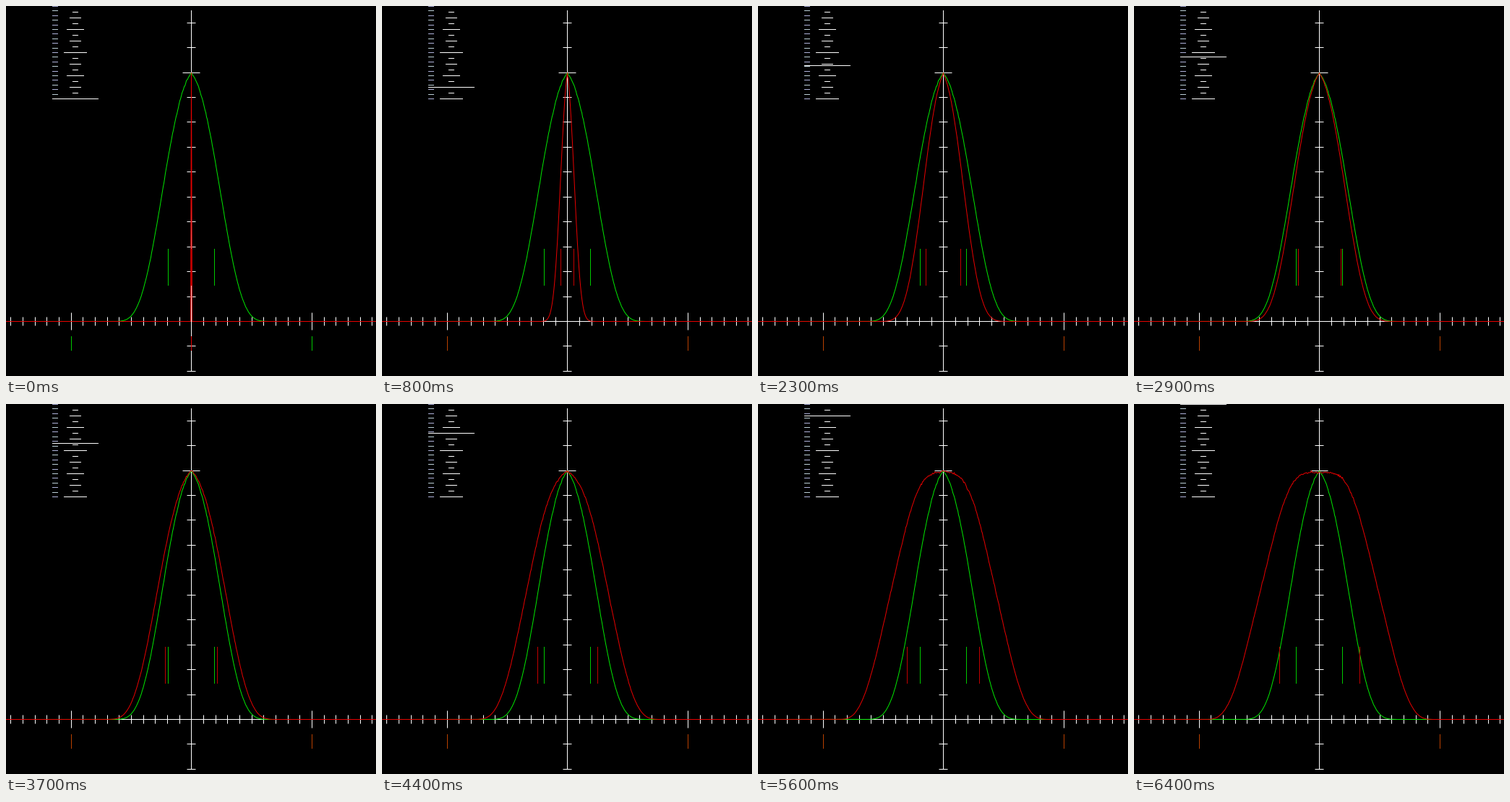
Write a matplotlib script that moves like this. It is 512x512 px and loops after 6.5 s.

```python
import numpy as np
import matplotlib.pyplot as plt
from matplotlib.animation import FuncAnimation

SIZE, DPI = 512, 64
STEPS = 64
CX, BASE = 256, 436          # origin of the plot in pixels
UNIT_X, UNIT_Y = 166.67, 344.5
PX = 72 / DPI                # one pixel in points

WHITE = "#ffffff"
GREEN, RED = "#00e600", "#e60000"
DIM_GREEN, DIM_RED, MIXED = "#00c800", "#c00000", "#b84000"

fig = plt.figure(figsize=(SIZE / DPI, SIZE / DPI), dpi=DPI, facecolor="black")
ax = fig.add_axes([0, 0, 1, 1])
ax.set_xlim(0, SIZE)
ax.set_ylim(SIZE, 0)
ax.axis("off")


def stroke(xs, ys, color, z):
    return ax.plot(xs, ys, color=color, lw=PX, zorder=z, snap=False,
                   solid_capstyle="butt")[0]


def hline(y, x0, x1, color=WHITE, z=1):
    y = round(y) + 0.5
    return stroke([x0, x1], [y, y], color, z)


def vline(x, y0, y1, color=WHITE, z=1):
    x = round(x) + 0.5
    return stroke([x, x], [y0, y1], color, z)


def spread(p):
    """Standard deviation of the smoothed noise."""
    return p * np.sqrt(2 / (9 * (1 + p)))


def density(p):
    """Peak-normalised density of a decaying sum of uniform noise."""
    if p == 0:
        return (cols == CX).astype(float)
    sd = spread(p)
    b = 0.5 + 0.5 * (1 - p) ** 1.5
    a = sd * np.sqrt(3 * (1 - b * b))
    terms = 40
    t = np.linspace(0, 20 / sd, 1000)
    k = np.arange(terms)[:, None]
    phi = np.sinc(a * b ** k * t / np.pi).prod(axis=0)
    # the remaining terms are close to a normal distribution
    phi *= np.exp(-0.5 * (t * sd * b ** terms) ** 2)
    phi[0] *= 0.5
    x = (cols - CX) / UNIT_X
    h = np.maximum(np.cos(np.outer(x, t)) @ phi, 0)
    # low settings have a pointed tip
    h *= 1 + 0.08 * (1 - p) * np.exp(-3 * np.abs(x) / sd)
    h /= h.max()
    rng = np.random.default_rng(int(p * STEPS) + 7)
    h += 0.0021 * np.sqrt(3 * sd * h) * rng.standard_normal(h.size)
    return np.maximum(h, 0) / h.max()


def curve_y(p):
    return BASE + 0.5 - (UNIT_Y - 0.5) * density(p)


cols = np.arange(-1, SIZE + 1)

# axes
hline(BASE, 0, SIZE)
vline(CX, 6, 506)
for k in range(-15, 16):
    half = 12 if abs(k) == 10 else 6
    vline(CX + 0.2 + k * UNIT_X / 10, BASE + 0.5 - half, BASE + 0.5 + half)
for k in range(-2, 13):
    half = 12 if k == 10 else 6
    hline(BASE - k * UNIT_Y / 10, CX + 0.5 - half, CX + 0.5 + half)

# slider rulers
for k in range(21):
    hline(6.4 * k, 64, 72, "#bcd0d8" if k % 2 else "#b0b4dc")
for k in range(1, 17):
    half = 4 * (1 + sum(k % d == 0 for d in (2, 4, 8)))
    hline(8 * k, 96 - half, 96 + half)

# fixed reference at the middle setting
stroke(cols + 0.5, curve_y(0.5), GREEN, 2)
for s in (-1, 1):
    vline(CX + 0.2 + s * spread(0.5) * UNIT_X, 336, 387, DIM_GREEN, 3)
    vline(CX + 0.2 + s * UNIT_X, 457, 477, DIM_GREEN, 3)

pointer = hline(128, 64, 128, WHITE, 5)
red = stroke([], [], RED, 4)
sd_marks = [vline(CX, 336, 387, DIM_RED, 4) for _ in range(2)]
end_marks = [vline(CX, 457, 477, RED, 4) for _ in range(2)]

curves = [curve_y(i / STEPS) for i in range(STEPS + 1)]


def move(line, x):
    x = round(x) + 0.5
    line.set_xdata([x, x])


def draw(i):
    p = i / STEPS
    y = 128 - 2 * i + 0.5
    pointer.set_ydata([y, y])
    red.set_data(cols + 0.5, curves[i])
    reach = UNIT_X if i else 0
    for s, sd_mark, end_mark in zip((-1, 1), sd_marks, end_marks):
        move(sd_mark, CX + 0.2 + s * spread(p) * UNIT_X)
        move(end_mark, CX + 0.2 + s * reach)
        end_mark.set_color(MIXED if i else RED)
    return [pointer, red, *sd_marks, *end_marks]


anim = FuncAnimation(fig, draw, frames=STEPS + 1, init_func=lambda: draw(0),
                     interval=100, repeat=True, repeat_delay=0, blit=False)
plt.show()
```
